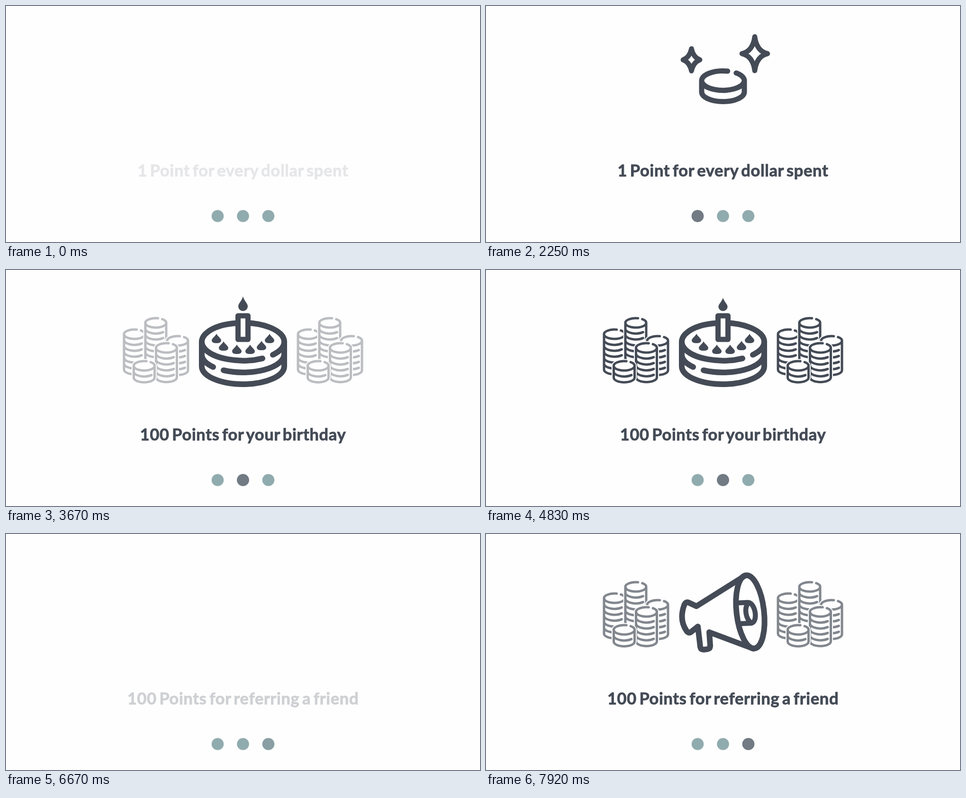
Animation, 1000 px wide and 500 px high, one loop 8000 ms. Source, as an HTML page:

```html
<!DOCTYPE html>
<html lang="en">
<head>
<meta charset="utf-8">
<title>Points</title>
<style>
  html, body { margin: 0; width: 100%; height: 100%; overflow: hidden; background: #fefefe; }
  svg { display: block; width: 1000px; height: 500px; }
  text {
    font: bold 34.4px Lato, "Open Sans", sans-serif; letter-spacing: .7px; word-spacing: -3.5px;
    text-anchor: middle; fill: #444b56; stroke: #444b56; stroke-width: .9;
  }
  .line { fill: none; stroke: #444b56; stroke-linecap: round; stroke-linejoin: round; }
  .solid { fill: #444b56; }
  .paper { fill: #fefefe; }
</style>
</head>
<body>
<svg id="stage" viewBox="0 0 1000 500"></svg>
<script>
const LOOP = 8000, STEP = 1000 / 12, BEAT = 1000 / 3;
const stage = document.getElementById('stage');

// Coin rim with a small gap at the upper right
function rim(cx, cy, rx, ry) {
  const at = k => `${cx + k * rx} ${cy - ry * Math.sqrt(1 - k * k)}`;
  return `M${at(.215)}A${rx} ${ry} 0 1 0 ${at(.62)}`;
}

// Front half of a coin edge, with its side walls
const wall = (cx, top, bottom, rx, ry) =>
  `M${cx - rx} ${top}V${bottom}A${rx} ${ry} 0 0 0 ${cx + rx} ${bottom}V${top}`;

function stack(cx, cy, count) {
  const rx = 22, ry = 10, gap = 12.5, bottom = cy + count * gap;
  let d = rim(cx, cy, rx, ry) + wall(cx, cy, bottom, rx, ry);
  for (let i = 1; i < count; i++) {
    const y = cy + i * gap;
    d += `M${cx - rx} ${y}A${rx} ${ry} 0 0 0 ${cx + rx * .7} ${y + ry * .714}`;
  }
  const body = `M${cx - rx} ${cy}A${rx} ${ry} 0 0 1 ${cx + rx} ${cy}V${bottom}A${rx} ${ry} 0 0 1 ${cx - rx} ${bottom}Z`;
  return `<path class="paper" stroke="#fefefe" stroke-width="9" d="${body}"/><path class="line" stroke-width="5" d="${d}"/>`;
}

const pile = x => `<g transform="translate(${x})">` +
  stack(271, 136, 6) + stack(316, 112, 7) + stack(362, 150, 5) +
  stack(338.5, 165, 5) + stack(291.5, 203, 2) + '</g>';

function star(id, w, h) {
  const d = `M0 ${-h}Q4-5 ${w} 0Q4 5 0 ${h}Q-4 5 ${-w} 0Q-4-5 0 ${-h}Z`;
  return `<path id="${id}" class="line" stroke-width="10.5" d="${d}"/>`;
}

const drop = ([x, y]) => `<path class="solid" transform="translate(${x} ${y})"
  d="M0-10C3-4 10 0 10 4Q10 10 0 10Q-10 10-10 4C-10 0-3-4 0-10Z"/>`;

const drops = [[444, 145], [459, 161], [487, 168], [515, 168], [539, 160], [556, 145]];
const labels = ['1 Point for every dollar spent', '100 Points for your birthday', '100 Points for referring a friend'];

stage.innerHTML = `
  <g id="scene0">
    <path id="coin" class="line" stroke-width="11" d="${rim(500, 158, 45, 20.5) + wall(500, 158, 182, 45, 20.5)}"/>
    ${star('starLeft', 17.7, 23.5)}${star('starRight', 27, 36)}
  </g>
  <g id="scene1">
    <g class="line" stroke-width="12">
      <path d="M541 187.3A87 40 0 1 1 587 152A87 40 0 0 1 563 179.6"/>
      <path d="${wall(500, 152, 204, 87, 38)}"/>
      <path d="M413 178A87 39 0 0 0 437 205.5M459 212.4A87 39 0 0 0 587 178"/>
    </g>
    ${drops.map(drop).join('')}
    <rect class="line" style="fill:#fefefe" stroke-width="11" x="489.5" y="97" width="21" height="50"/>
    <path id="flame" class="solid" d="M500 56C503 66 510 71 510 77A10 10 0 0 1 490 77C490 71 497 66 500 56Z"/>
  </g>
  <g id="piles">${pile(0)}${pile(367)}</g>
  <g id="horn" class="line" stroke-width="12">
    <ellipse cx="557.5" cy="165" rx="29" ry="78" transform="rotate(-6.5 557.5 165)"/>
    <path d="M547 88L444 153L427 145Q421 143 418 151Q407 182 423 205Q427 211 432 208L447 196L452 239Q453 245 459 245L467 244Q473 243 473 237L471 208L564 243"/>
    <path stroke-width="10.5" d="M531 146L553 145C568 146 575 185 560 189L536 190M553 146C544 158 548 180 560 189"/>
  </g>
  ${labels.map((s, i) => `<text id="label${i}" x="500" y="361">${s}</text>`).join('')}
  ${labels.map((_, i) => `<g transform="translate(${446.5 + 53.5 * i} 445)">
    <circle r="12.8" fill="#90abae"/><circle id="dot${i}" r="12.8" fill="#727a84"/></g>`).join('')}`;

const el = id => document.getElementById(id);
const ramp = (t, a, b) => Math.min(1, Math.max(0, (t - a) / (b - a)));
const shown = (t, inA, inB, outA = LOOP * 2, outB = LOOP * 3) => ramp(t, inA, inB) * (1 - ramp(t, outA, outB));
const fade = (id, value) => el(id).setAttribute('opacity', value);
const move = (id, value) => el(id).setAttribute('transform', value);

function draw(t) {
  // Captions, dots and main icons
  const first = [2833, 3083], second = [6333, 6583];
  const text = [shown(t, -60, 420, ...first), shown(t, 3083, 3417, ...second), shown(t, 6583, 6917)];
  text.forEach((v, i) => fade('label' + i, v));
  fade('dot0', shown(t, 83, 500, ...first));
  fade('dot1', shown(t, 3083, 3500, ...second));
  fade('dot2', text[2]);
  fade('scene0', 1 - ramp(t, ...first));
  fade('scene1', text[1]);
  fade('piles', shown(t, 3480, 4000, ...second) + ramp(t, 7583, 8083));
  fade('horn', ramp(t, 6917, 7000));

  // Coin spins down into place
  const left = Math.pow(1 - ramp(t, 80, 830), 2.7);
  move('coin', `translate(0 ${-230 * left}) rotate(${180 * left} 500 170)`);

  // Stars pop, then pulse
  const pulse = .1 * Math.sin((t - 2250) / (2 * BEAT) * 2 * Math.PI);
  const pop = ramp(t, 833, 1083);
  fade('starLeft', pop ? 1 : 0);
  fade('starRight', pop ? 1 : 0);
  move('starLeft', `translate(433.5 114) scale(${pop * (1 + pulse)})`);
  move('starRight', `translate(567 101) scale(${pop * (1 + pulse)})`);

  // Flame rests for a quarter of each beat, then dips
  const u = (t + 4 * LOOP - 4000) / BEAT % 1;
  const dip = Math.max(0, Math.min((u - .25) * 2, (1 - u) * 4));
  move('flame', `translate(500 87) scale(${1 - .08 * dip} ${1 - .18 * dip}) translate(-500 -87)`);

  // Horn drops in and swings
  const swing = -20.5 * Math.cos((t - 7166.7) / BEAT * 2 * Math.PI);
  move('horn', `translate(0 ${-70 * (1 - ramp(t, 6917, 7167))}) rotate(${swing} 500 171)`);
}

const start = performance.now();
function tick() {
  const t = (performance.now() - start) % LOOP;
  draw(Math.floor((t + 4) / STEP) * STEP % LOOP);
  requestAnimationFrame(tick);
}
tick();
</script>
</body>
</html>
```
